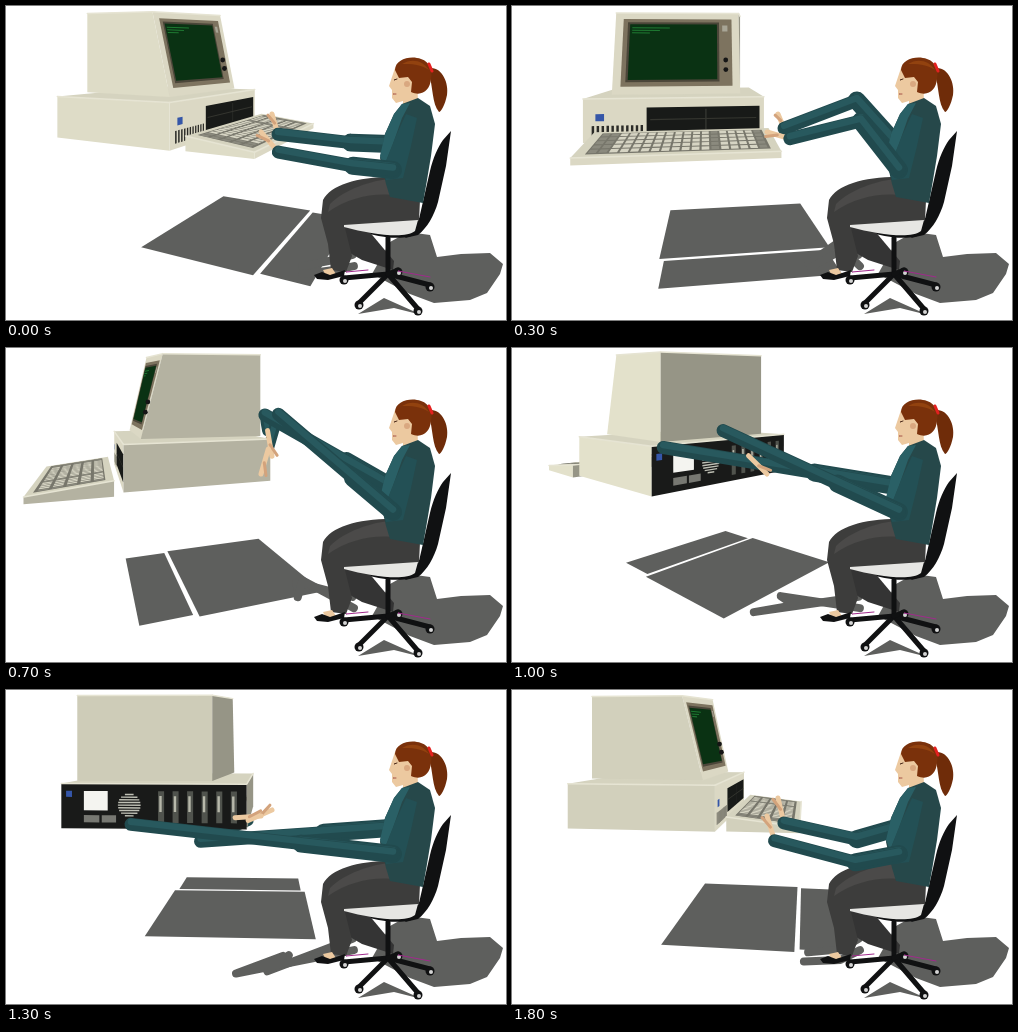
These frames come from a looping animation (500x314 px, 1900 ms). An HTML page with a canvas:

```html
<!DOCTYPE html>
<html lang="en">
<head>
<meta charset="utf-8">
<title>Turning computer</title>
<style>
html, body { margin: 0; width: 100%; height: 100%; overflow: hidden; background: #fff; }
canvas { display: block; width: 500px; height: 314px; }
</style>
</head>
<body>
<canvas id="stage" width="500" height="314"></canvas>
<script>
const g = document.getElementById('stage').getContext('2d');
const STEP = 100, COUNT = 19, RAD = Math.PI / 180;
const SHADOW = '#5e5f5d', SKIN = '#ecc9a0', INK = '#101112';

const mix = (a, b, u) => a + (b - a) * u;
const between = (p, q, u) => [mix(p[0], q[0], u), mix(p[1], q[1], u)];

// smooth hump around step c that wraps with the loop
function hump(k, c, width) {
  const d = Math.abs(k - c), near = Math.min(d, COUNT - d);
  return Math.exp(-((near / width) ** 2));
}
const heading = k => (65 - 360 * k / COUNT - 8 * hump(k, 10.2, 1.8)) * RAD;

// the sleeve reaches from shoulder to tip, then folds back to the hand
function arm(shoulder, tip, hand, k) {
  const mid = between(shoulder, tip, 0.35);
  mid[1] += 13 * hump(k, 18, 0.8) - 38 * hump(k, 3, 1.5);
  const len = Math.hypot(hand[0] - tip[0], hand[1] - tip[1]);
  return { shoulder, mid, tip, hand, wrist: between(hand, tip, Math.min(1, 26 / len)) };
}
const farArm = k => arm([384, 138], [
  272 - 140 * hump(k, 11, 2.6),
  127 - 62 * hump(k, 7.5, 2.8) + 50 * hump(k, 14.8, 2.2)
], [266, 108 + 14 * hump(k, 12, 2.5)], k);
const nearArm = k => arm([387, 164], [
  278 - 153 * hump(k, 13, 3.3),
  145 - 85 * hump(k, 8, 3.6) + 16 * hump(k, 16, 2)
], [255, 126], k);

function trace(pts) {
  g.beginPath();
  pts.forEach(p => g.lineTo(p[0], p[1]));
}
function poly(pts, fill) {
  trace(pts);
  g.closePath();
  g.fillStyle = fill;
  g.fill();
}
function line(pts, color, width) {
  trace(pts);
  g.strokeStyle = color;
  g.lineWidth = width;
  g.stroke();
}
function shape(d, fill) {
  g.fillStyle = fill;
  g.fill(new Path2D(d));
}
function disc(x, y, r, fill) {
  g.beginPath();
  g.arc(x, y, r, 0, 7);
  g.fillStyle = fill;
  g.fill();
}

let ang = 0;

// f: towards the front, t: to the right, y: down from eye level
function project(f, t, y, cx = -82, cz = 0) {
  const s = Math.sin(ang), c = Math.cos(ang);
  const k = 400 / (400 - (f * c - t * s) + cz);
  return [250 + (f * s + t * c + cx) * k, 55 + y * (y < 0 ? k ** 0.3 : k)];
}
function facing(p) {
  let sum = 0;
  p.forEach((a, i) => { const b = p[(i + 1) % p.length]; sum += a[0] * b[1] - b[0] * a[1]; });
  return sum > 0;
}
function tint(side) {
  const l = 0.66 + 0.34 * Math.max(0, Math.cos(ang + side * Math.PI / 2 + 45 * RAD));
  return `rgb(${[227, 225, 203].map(v => v * l).join()})`;
}

// walls: 0 front, 1 right, 2 back, 3 left
function box(b, fills = {}) {
  const ring = [[1, -1], [1, 1], [0, 1], [0, -1]];
  const across = ([front, s]) => s * b.w + (front ? b.shift : b.backShift);
  const top = ring.map(c => project(c[0] ? b.ft : b.back, across(c), c[0] ? b.topF : b.topB));
  const low = ring.map(c => project(c[0] ? b.fb : b.back, across(c), b.low));
  const lid = [3, 2, 1, 0].map(i => top[i]);
  if (facing(lid)) poly(lid, '#d5d3bf');
  return ring.map((c, i) => {
    const n = (i + 1) % 4, wall = [top[i], top[n], low[n], low[i]];
    if (!facing(wall)) return false;
    poly(wall, fills[i] || tint(i));
    line([top[i], top[n]], '#e6e4d3', 1.5);
    return true;
  });
}
function panel(f, t0, y0, t1, y1, fill) {
  const at = typeof f === 'function' ? f : () => f;
  poly([project(at(y0), t0, y0), project(at(y0), t1, y0),
        project(at(y1), t1, y1), project(at(y1), t0, y1)], fill);
}

const CREAM = '#dbd8c4';
const BASE = { ft: 53, fb: 53, back: -71, w: 77, shift: 0, backShift: 0, topF: 32, topB: 32, low: 69 };
const TUBE = { ft: 20, fb: 38, back: -66, w: 57, shift: 0, backShift: 9, topF: -47, topB: -47, low: 30 };
const KEYS = { ft: 120, fb: 120, back: 60, w: 73, shift: 7, backShift: 7, topF: 66, topB: 59, low: 71 };

function drawBase() {
  const seen = box(BASE, { 0: CREAM, 2: '#191a19' });
  if (seen[0]) {
    panel(53, -25, 40, 73, 62, '#181a18');
    panel(53, 25, 42, 26, 60, '#393b36');
    panel(53, -22, 50, 70, 51, '#34352f');
    for (let t = -70; t < -28; t += 4) panel(53, t, 55, t + 2, 65, '#2b2b27');
    panel(53, -67, 45, -60, 51, '#3556a8');
  }
  if (seen[2]) {
    const rear = (u0, y0, u1, y1, c) => panel(-71, -u0, y0, -u1, y1, c);
    rear(-73, 38, -68, 43, '#3556a8');
    rear(-58, 38, -38, 54, '#f4f4f0');
    rear(-58, 58, -45, 64, '#777872');
    rear(-43, 58, -31, 64, '#777872');
    for (let i = -4; i < 5; i++) {
      const r = Math.sqrt(90 - 4.8 * i * i);
      rear(-20 - r, 49 + i * 2.2, -20 + r, 50.2 + i * 2.2, '#bfc0b5');
    }
    for (let u = 4; u < 70; u += 12) {
      rear(u, 38, u + 5, 64, '#50534d');
      rear(u + 1, 42, u + 3, 55, '#b7b8aa');
    }
  }
}

function drawTube() {
  if (!box(TUBE, { 0: CREAM })[0]) return;
  const slant = y => mix(TUBE.ft, TUBE.fb, (y + 47) / 77);
  panel(slant, -50, -41, 50, 23, '#7d735f');
  panel(slant, -46, -38, 38, 19, '#4b4639');
  panel(slant, -44, -36, 36, 17, '#0a3213');
  for (let i = 0; i < 3; i++) panel(slant, -42, -33 + i * 2.5, -8 - i * 9, -32 + i * 2.5, '#1f7a32');
  panel(slant, 41, -35, 46, -29, '#a8a596');
  for (const y of [-1, 8]) disc(...project(slant(y), 44, y), 2.4, '#151515');
}

function drawKeys() {
  box(KEYS, { 0: CREAM });
  const row = f => mix(58.5, 65.5, (f - 60) / 60);
  const patch = (f0, t0, f1, t1, c) => poly(
    [[f0, t0], [f0, t1], [f1, t1], [f1, t0]].map(p => project(p[0], p[1], row(p[0]))), c);
  patch(66, -58, 115, 73, '#77766b');
  for (let r = 0; r < 5; r++) {
    for (let n = 0; n < 18; n++) {
      const f = 67 + r * 9.6, t = -57 + n * 7.2;
      const dark = n < 2 || n === 12 || n > 16;
      patch(f, t, f + 7.2, t + 5.6, dark ? '#8b8a7e' : '#d6d4c3');
    }
  }
}

function drawShadow(arms) {
  const slab = (f0, f1, w) => poly(
    [[f0, -w], [f0, w], [f1, w], [f1, -w]].map(p => project(p[0], p[1], 200, -25, 82)), SHADOW);
  slab(-67, 66, 89);
  slab(71, 120, 84);
  const fall = ([x, y]) => [230 + (x - 125) * 0.45, 277 + (y - 120) * 0.45 - (x - 125) * 0.14];
  for (const a of arms) line([a.shoulder, a.mid, a.tip, a.wrist].map(fall), SHADOW, 8);
  shape('M384 236L402 226 424 229 431 251 455 248 484 247 497 258 494 268 481 287 464 294 428 297 404 288 366 268Z', SHADOW);
  shape('M352 308L378 292 416 309 388 302Z', SHADOW);
}

function sleeve(pts, width) {
  line(pts, '#214a4e', width);
  line(pts.map(p => [p[0], p[1] - 2.5]), '#28595e', width / 2);
}
const drawFold = a => sleeve([a.tip, a.wrist], 11);
function drawHand({ wrist, hand }) {
  const [dx, dy] = [hand[0] - wrist[0], hand[1] - wrist[1]];
  line([wrist, hand], SKIN, 5);
  line([between(wrist, hand, 0.55), [hand[0] + dy / 5, hand[1] - dx / 5]], '#d3a37c', 3);
}
function drawArm(a) {
  drawHand(a);
  sleeve([a.shoulder, a.mid], 18);
  sleeve([a.shoulder, a.mid, a.tip], 13);
}

function drawBody() {
  // chair
  shape('M445 125L440 160 432 196C428 210 421 222 412 229L399 232 413 213 424 165C427 152 432 141 437 134Z', INK);
  shape('M336 219L415 212 411 227C400 236 368 232 336 219Z', INK);
  // legs
  shape('M338 216L362 224 388 255 387 264 356 254 332 240Z', '#343434');
  shape('M386 171C350 171 325 179 317 194L315 212 322 238 325 264 340 266 346 250 339 222 413 215 414 194Z', '#3d3d3c');
  shape('M386 173C365 174 338 184 324 198L322 206C345 190 372 186 392 190Z', '#4b4a49');
  shape('M338 219L412 214 409 225C399 233 368 229 338 221Z', '#e6e6e3');
  shape('M317 264L326 262 330 268 320 270Z', SKIN);
  shape('M308 269L316 266 324 269 339 264 338 270 322 274 311 273Z', INK);
  // chair foot
  line([[382, 232], [382, 268]], INK, 5);
  for (const [x, y] of [[338, 272], [353, 297], [412, 303], [424, 279], [392, 264]]) {
    line([[382, 268], [x, y]], INK, 5);
    disc(x, y + 2, 4.5, INK);
    disc(x + 1, y + 3, 2, '#d4d4d4');
  }
  line([[340, 266], [362, 264]], '#a02a8c', 1);
  line([[392, 265], [424, 271]], '#a02a8c', 1);
  // head
  shape('M424 62C436 61 443 77 441 89C439 99 435 106 433 106C426 98 427 80 423 68Z', '#6f2c09');
  shape('M389 62L386 71 383 80 386 84 386 92 390 97 397 95 397 100 412 96 411 70Z', SKIN);
  shape('M389 64C389 53 405 49 415 53C424 56 427 64 425 73C424 84 416 91 405 86L406 76 402 71 393 72Z', '#7a310b');
  shape('M396 58C405 52 417 54 423 64C414 58 405 58 396 58Z', '#92420f');
  disc(401, 78, 3, '#d9a880');
  line([[388, 74], [391, 73]], '#4a2a1a', 1);
  line([[387, 88], [390, 88]], '#a65548', 1);
  line([[423, 58], [426, 65]], '#e3211f', 3);
  // jacket
  shape('M396 98L412 92 424 100 429 118 425 150 420 180 417 197 384 191 380 178 374 152 379 128 388 108Z', '#26484a');
  shape('M396 98L404 97 396 112 387 138 378 160 374 150 379 128 388 108Z', '#2a6066');
  shape('M400 108L411 112 405 140 397 172 380 174 377 163 389 132Z', '#235055');
}

function draw(k) {
  ang = heading(k);
  const far = farArm(k), near = nearArm(k);
  const front = Math.cos(ang) > -0.1;
  g.fillStyle = '#fff';
  g.fillRect(0, 0, 500, 314);
  g.lineJoin = g.lineCap = 'round';
  drawShadow([far, near]);
  drawFold(far);
  drawFold(near);
  if (!front) drawKeys();
  drawBase();
  drawTube();
  if (front) drawKeys();
  drawArm(far);
  drawBody();
  drawArm(near);
}

const start = performance.now();
let shown = -1;
function tick() {
  const k = Math.floor((performance.now() - start) / STEP) % COUNT;
  if (k !== shown) draw(shown = k);
  requestAnimationFrame(tick);
}
tick();
</script>
</body>
</html>
```
